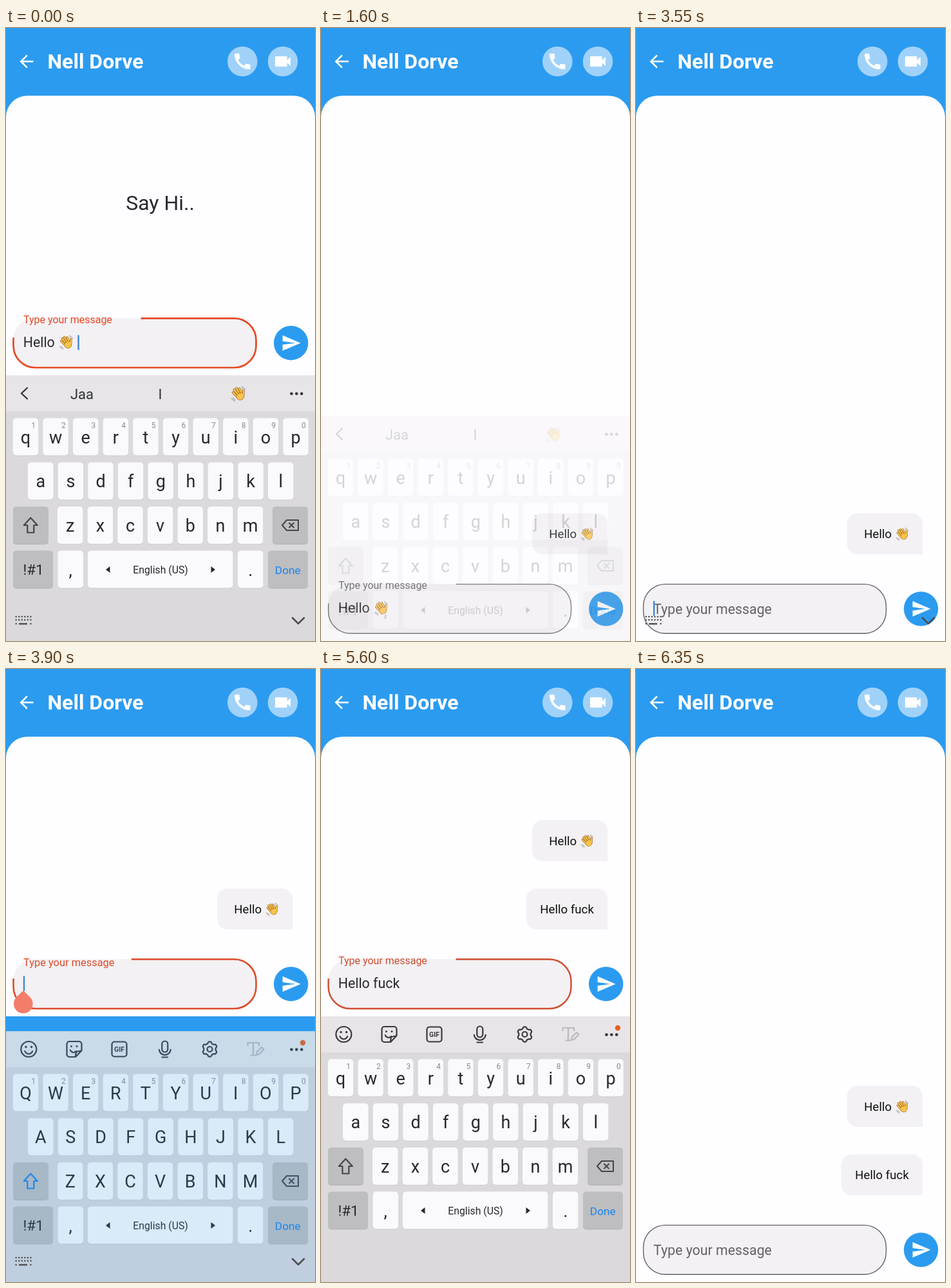
These frames come from a looping animation (480 px wide and 953 px high, 8000 ms). An HTML page with a canvas:

```html
<!DOCTYPE html>
<html lang="en">
<head>
<meta charset="utf-8">
<title>Chat</title>
<style>
  html, body { margin: 0; width: 100%; height: 100%; overflow: hidden; background: #2b9bf0; }
  canvas { display: block; width: 480px; height: 953px; }
</style>
</head>
<body>
<canvas id="stage"></canvas>
<script>
const W = 480, H = 953, LOOP = 8000;
const DROP = 413.3;             // how far the chat sinks without the keyboard
const SENDS = [1200, 5400];
const FOCUS = 3550, OPEN = 3790, TYPED = 4550;
const BLUE = '#2b9bf0', SHEET = '#fefdff', SOFT = '#f3f1f4', INK = '#29282c';
const RED = [230, 74, 38], GREY = [100, 98, 103];
const dpr = window.devicePixelRatio || 1;

function setup(canvas) {
  canvas.width = W * dpr;
  canvas.height = H * dpr;
  const ctx = canvas.getContext('2d');
  ctx.scale(dpr, dpr);
  ctx.lineCap = ctx.lineJoin = 'round';
  return ctx;
}
const screen = setup(document.getElementById('stage'));
const layer = document.createElement('canvas');
const board = setup(layer);
let c = screen;

const ICONS = {
  call: new Path2D('M20 15.4c-1.2 0-2.4-.2-3.5-.6-.4-.1-.7 0-1 .3l-1.6 1.9c-2.8-1.3-5.5-3.9-6.9-6.8l2-1.7c.3-.3.3-.6.2-1C8.8 6.4 8.6 5.2 8.6 4c0-.6-.4-1-1-1H4.2C3.7 3 3 3.2 3 4c0 9.3 7.7 17 17 17 .7 0 1-.6 1-1.2v-3.4c0-.6-.4-1-1-1z'),
  video: new Path2D('M17 10.5V7c0-.6-.4-1-1-1H4c-.6 0-1 .4-1 1v10c0 .6.4 1 1 1h12c.6 0 1-.4 1-1v-3.5l4 4v-11z'),
  send: new Path2D('M2 21 23 12 2 3v7l15 2-15 2z')
};

const clamp = v => Math.min(1, Math.max(0, v));
const ramp = (t, from, len) => clamp((t - from) / len);
const mix = (a, b, p) => a + (b - a) * p;
const tint = p => `rgb(${GREY.map((g, i) => Math.round(mix(g, RED[i], p)))})`;

// cubic-bezier(.4, 0, .2, 1)
function ease(x) {
  if (x <= 0 || x >= 1) return x;
  let lo = 0, hi = 1, s = x;
  for (let i = 0; i < 18; i++) {
    s = (lo + hi) / 2;
    const n = 1 - s;
    if (1.2 * n * n * s + 0.6 * n * s * s + s * s * s < x) lo = s; else hi = s;
  }
  return s * s * (3 - 2 * s);
}

function text(str, x, y, size, color, align = 'left', weight = 400) {
  c.font = `${weight} ${size}px Roboto, "Open Sans", sans-serif`;
  c.textAlign = align;
  c.fillStyle = color;
  c.fillText(str, x, y);
}
function box(x, y, w, h, r, color) {
  c.beginPath();
  c.roundRect(x, y, w, h, r);
  c.fillStyle = color;
  c.fill();
}
function disc(x, y, r, color) {
  c.beginPath();
  c.arc(x, y, r, 0, 7);
  c.fillStyle = color;
  c.fill();
}
function pen(color, width) {
  c.strokeStyle = color;
  c.lineWidth = width;
}
function line(...pts) {
  c.beginPath();
  for (let i = 0; i < pts.length; i += 2) c.lineTo(pts[i], pts[i + 1]);
  c.stroke();
}
function ring(x, y, r, a = 0, b = Math.PI * 2) {
  c.beginPath();
  c.arc(x, y, r, a, b);
  c.stroke();
}
function icon(path, x, y, s) {
  c.save();
  c.translate(x - 12 * s, y - 12 * s);
  c.scale(s, s);
  c.fillStyle = '#fff';
  c.fill(path);
  c.restore();
}

function wave(x, y, size) {
  const skin = '#f9c34a', edge = '#8f5a1c';
  c.save();
  c.translate(x, y);
  c.scale(size / 24, size / 24);
  pen('#857c74', 0.9);
  ring(1, 0, 11.2, -1.2, -0.55);
  ring(1, 0, 9, -1.05, -0.65);
  ring(-1, 1, 11, 1.95, 2.6);
  ring(-1, 1, 9, 2.05, 2.5);
  c.rotate(-0.6);
  const limb = (...pts) => {
    pen(edge, 3.5);
    line(...pts);
    pen(skin, 2.3);
    line(...pts);
  };
  limb(4, 7, 8.8, 0.5);
  limb(4, 3, 5.4, -5.5);
  limb(1.5, 2, 2, -8.2);
  limb(-1.3, 2, -1.9, -8.5);
  limb(-4, 3, -5.6, -6);
  c.beginPath();
  c.ellipse(0, 5, 5.4, 5, 0, 0, 7);
  pen(edge, 1.2);
  c.stroke();
  c.fillStyle = skin;
  c.fill();
  pen(skin, 2.3);
  line(-4, 3, 4, 3);
  line(4, 6.5, 6, 4);
  c.restore();
}

function header() {
  c.fillStyle = BLUE;
  c.fillRect(0, 0, W, H);
  pen('#fff', 2.6);
  c.lineCap = 'butt';
  c.lineJoin = 'miter';
  line(42.7, 52, 24, 52);
  line(32.8, 42.3, 23.2, 52, 32.8, 61.7);
  c.lineCap = c.lineJoin = 'round';
  text('Nell Dorve', 64.5, 62.5, 32, '#fff', 'left', 700);
  disc(367.3, 52, 23.3, '#a0d2f9');
  disc(430, 52, 23.3, '#a0d2f9');
  icon(ICONS.call, 367.3, 52, 1.36);
  icon(ICONS.video, 430, 52, 1.333);
}

function bubble(x, y, msg, hand) {
  box(x, y, 445.3 - x, 63.7, [16, 16, 0, 16], SOFT);
  text(msg, hand ? 354.3 : 340.3, y + 38.5, 18.67, '#111');
  if (hand) wave(413.5, y + 32, 21.5);
}

function outline(float, focus) {
  const l = 11.5, r = 388.5, t = 451.3, b = 528, k = 34;
  pen(tint(focus), mix(1.4, 2.7, focus));
  c.lineCap = 'butt';
  c.beginPath();
  if (float > 0) {
    c.moveTo(Math.max(l + k, 26.5 + 183 * float), t);
    c.arcTo(r, t, r, b, k);
    c.arcTo(r, b, l, b, k);
    c.arcTo(l, b, l, t, k);
    c.lineTo(l, t + k);
    c.arc(l + k, t + k, k, Math.PI, Math.PI + 0.12);
  } else {
    c.roundRect(l, t, r - l, b - t, k);
  }
  c.stroke();
  c.lineCap = 'round';
}

function field(s) {
  box(11, 451, 378, 77.3, 34, SOFT);
  outline(s.float, s.focus);
  text('Type your message', 27, mix(497.5, 459, s.float),
    21.33 * (1 - 0.25 * s.float), tint(s.focus));
  if (s.draft) text(s.draft, 26.7, 496, 21.33, INK);
  if (s.draftHand) wave(93.5, 488.5, 23.5);
  if (s.cursor) {
    c.fillStyle = '#3d87d3';
    c.fillRect(s.cursor - 1.2, 477.5, 2.4, 23);
  }
  disc(442.7, 489.7, 26.7, BLUE);
  icon(ICONS.send, 443, 489.7, 1.333);
  if (s.handle) {
    c.fillStyle = '#f37e68';
    c.beginPath();
    c.arc(26.8, 520.5, 14.8, -Math.PI / 4, Math.PI * 1.25);
    c.lineTo(26.8, 500);
    c.fill();
  }
}

function suggestions() {
  pen('#333236', 2.3);
  line(33, 559.5, 24, 568, 33, 576.5);
  text('Jaa', 118, 576.5, 22, '#333236', 'center');
  text('I', 239.5, 576.5, 22, '#333236', 'center');
  wave(361, 568.5, 25);
}

function tools() {
  const y = 568, ink = '#3a393d';
  pen(ink, 2.2);
  ring(35.3, y, 12);
  ring(35.3, y + 1, 6.3, 0.35, 2.8);
  disc(31, y - 3.5, 1.7, ink);
  disc(39.6, y - 3.5, 1.7, ink);

  c.beginPath();
  c.moveTo(117.5, y + 2);
  c.arcTo(117.5, y - 12, 106, y - 12, 4);
  c.arcTo(94.5, y - 12, 94.5, y, 4);
  c.arcTo(94.5, y + 12, 106, y + 12, 4);
  c.lineTo(108, y + 12);
  c.closePath();
  c.stroke();
  line(108, y + 11, 109, y + 4, 116.5, y + 2.5);
  ring(105, y - 0.5, 5.5, 0.7, 2.8);
  disc(101.5, y - 4.5, 1.5, ink);
  disc(110, y - 4.5, 1.5, ink);

  c.beginPath();
  c.roundRect(164.5, y - 11.5, 23, 23, 4);
  c.stroke();
  text('GIF', 176, y + 3.8, 10.5, ink, 'center', 700);

  c.beginPath();
  c.roundRect(242.3, y - 12.5, 9, 17, 4.5);
  c.stroke();
  ring(246.8, y, 9, 0.1, Math.PI - 0.1);
  line(242.5, y + 12.5, 251, y + 12.5);

  // six-toothed gear
  c.beginPath();
  for (let i = 0; i <= 72; i++) {
    const a = i * Math.PI / 36, r = 10.4 + 1.3 * Math.tanh(2 * Math.cos(6 * a));
    c.lineTo(316.5 + r * Math.sin(a), y + r * Math.cos(a));
  }
  c.closePath();
  c.stroke();
  ring(316.5, y, 4);

  pen('#bbb9bd', 2.2);
  line(375.5, y - 6, 375.5, y - 10, 393, y - 10, 393, y - 6);
  line(384, y - 10, 384, y + 9);
  line(380.5, y + 9.5, 387, y + 9.5);
  line(389, y + 9, 390, y + 4, 397, y - 3, 400.5, y, 393.5, y + 7.5, 389, y + 9);
  disc(461, y - 10, 4.2, '#e8601f');
}

function key(x, y, w, label, dark) {
  box(x, y + 1, w, 58, 5, dark ? '#b3b2b5' : '#cbcacd');
  box(x, y, w, 58, 5, dark ? '#bebdc0' : '#faf9fb');
  if (label) text(label, x + w / 2, y + 39, 27, INK, 'center');
}

function keyboard(upper, withTools) {
  c.clearRect(0, 0, W, H);
  c.fillStyle = '#dbd9dc';
  c.fillRect(0, 540, W, H);
  c.fillStyle = '#e7e5e8';
  c.fillRect(0, 540, W, 56);
  if (withTools) tools(); else suggestions();
  for (const x of [443.5, 451.3, 459.2]) disc(x, 568.5, 2.3, '#333236');

  const rows = [['qwertyuiop', 10.7, 606.5], ['asdfghjkl', 34, 675.3], ['zxcvbnm', 80, 744]];
  for (const [chars, x0, y] of rows) {
    [...chars].forEach((ch, i) => {
      const x = x0 + i * 46.62;
      key(x, y, 39.5, upper ? ch.toUpperCase() : ch);
      if (chars.length === 10) text((i + 1) % 10, x + 32, y + 15.5, 12, '#8b8a8e', 'center');
    });
  }

  key(11, 744, 55, '', true);
  pen(upper ? '#1c86e8' : '#464549', 2.2);
  c.beginPath();
  for (const [x, y] of [[0, -12], [10.5, -0.5], [5, -0.5], [5, 11], [-5, 11], [-5, -0.5], [-10.5, -0.5]])
    c.lineTo(38.3 + x, 773.5 + y);
  c.closePath();
  c.stroke();

  key(414, 744, 55, '', true);
  pen('#464549', 2);
  c.beginPath();
  for (const [x, y] of [[-13, 0], [-6, -8], [12, -8], [12, 8], [-6, 8]]) c.lineTo(442 + x, 773 + y);
  c.closePath();
  c.stroke();
  line(440, 769.5, 447, 776.5);
  line(447, 769.5, 440, 776.5);

  const y = 812.5;
  key(11, y, 62, '', true);
  text('!#1', 42.5, 850, 22.4, INK, 'center');
  key(80.5, y, 39.5, ',');
  key(127, y, 225.5);
  text('English (US)', 240, 848, 15.8, INK, 'center');
  c.fillStyle = INK;
  for (const [x, d] of [[158.5, -1], [321.5, 1]]) {
    c.beginPath();
    c.moveTo(x + 3.5 * d, 842);
    c.lineTo(x - 3 * d, 837);
    c.lineTo(x - 3 * d, 847);
    c.fill();
  }
  key(360, y, 39.5, '.');
  key(407, y, 62, '', true);
  text('Done', 437.8, 848.5, 17.3, '#1c86e8', 'center');
}

function navIcons() {
  c.fillStyle = '#59585c';
  for (let i = 0; i < 6; i++) {
    const x = 14.5 + i * 4.55;
    c.fillRect(x, 914, 2.3, 2.3);
    c.fillRect(x, 919, 2.3, 2.3);
    if (i === 0 || i === 5) c.fillRect(x, 925, 2.3, 2.3);
  }
  c.fillRect(20, 925, 13, 2.6);
  pen('#4d4c50', 2.5);
  line(445, 917, 454, 926, 463, 917);
}

function stateAt(t) {
  const second = t >= FOCUS;
  const sent = SENDS[second ? 1 : 0];
  const opening = second && t < sent;
  const rise = ease(ramp(t, OPEN, 167));
  const blur = ramp(t, sent + 180, 110);
  const cleared = ease(ramp(t, sent + 580, 170));
  const typed = !second || t >= TYPED;
  const hasDraft = typed && t < sent + 580;

  const slide = 1 - (1 - ramp(t, 3780, 265)) ** 2;
  const hide = ramp(t, sent + 300, 125);
  const kb = opening
    ? { y: 78 * (1 - slide), alpha: Math.min(1, 1.2 * slide) }
    : { y: 78 * hide, alpha: 1 - hide };

  const blink = second
    ? (t - FOCUS) % 1000 < 500 && t < sent
    : t % 1000 < 500 && t < sent + 180;
  const cursorX = !second ? 112.5 : typed ? 123 : 28;

  return {
    shift: (opening ? t < OPEN : t >= sent + 300) ? DROP : 0,
    count: SENDS.filter(at => t >= at + 50).length,
    float: opening ? rise : 1 - cleared,
    focus: opening ? rise : 1 - blur,
    draft: hasDraft ? (second ? 'Hello fuck' : 'Hello') : '',
    draftHand: hasDraft && !second,
    cursor: blink ? cursorX : 0,
    handle: t >= 3850 && t < TYPED,
    upper: second && !typed,
    tools: second,
    nav: t < sent + 150,
    kb
  };
}

function draw(t) {
  const s = stateAt(t);
  c = screen;
  header();
  c.save();
  c.beginPath();
  c.rect(0, 0, W, s.shift ? H : 540);
  c.clip();
  box(0, 105.3, W, H, [33, 33, 0, 0], SHEET);
  if (!s.count) text('Say Hi..', 239.5, 283, 32, INK, 'center');
  c.translate(0, s.shift);
  if (s.count === 1) bubble(328, 341.3, 'Hello', true);
  if (s.count === 2) {
    bubble(328, 235, 'Hello', true);
    bubble(319, 341.3, 'Hello fuck');
  }
  field(s);
  c.restore();

  if (s.kb.alpha > 0) {
    c = board;
    keyboard(s.upper, s.tools);
    c = screen;
    c.globalAlpha = s.kb.alpha;
    c.drawImage(layer, 0, s.kb.y, W, H);
    c.globalAlpha = 1;
  }
  if (s.nav) navIcons();
}

const start = performance.now();
function tick() {
  draw((performance.now() - start) % LOOP);
  requestAnimationFrame(tick);
}
tick();
</script>
</body>
</html>
```
